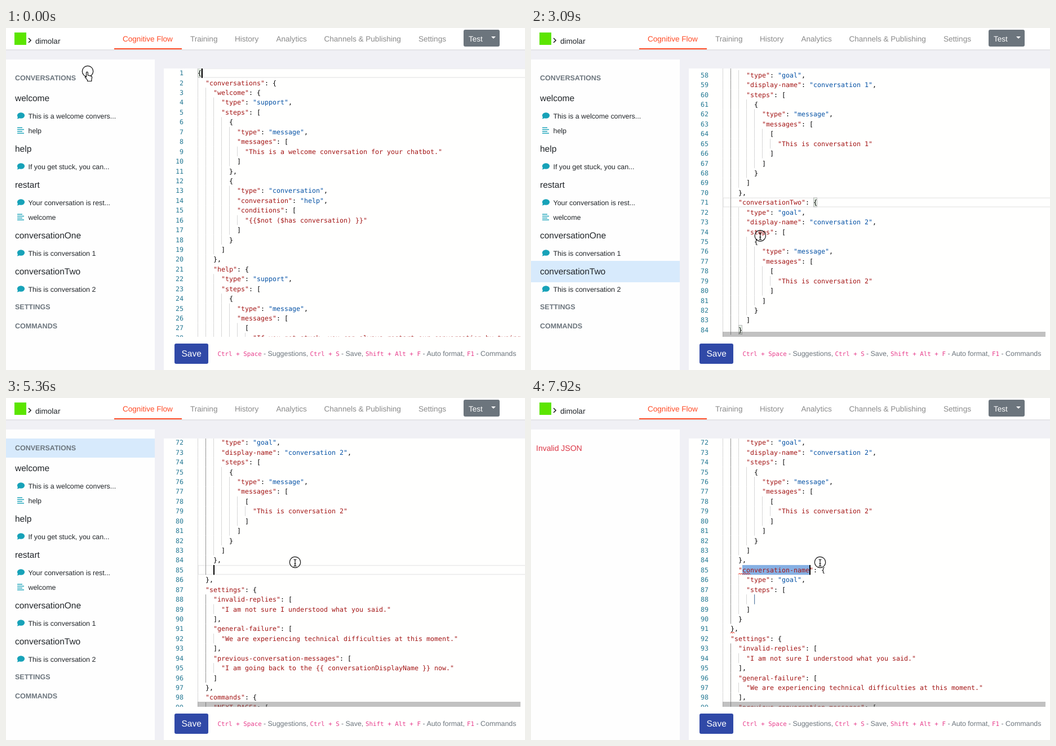
These frames come from a looping animation (921 px wide and 608 px high, 8000 ms). An HTML page:

```html
<!DOCTYPE html>
<html lang="en">
<head>
<meta charset="utf-8">
<title>Conversation editor</title>
<style>
html, body { margin: 0; width: 100%; height: 100%; overflow: hidden; background: #f0f0f5; }
svg { display: block; }
text { font: 13.55px "Liberation Sans", Arial, sans-serif; text-rendering: geometricPrecision; fill: #212529; }
.nav { fill: #8a8a8a; }
.head { font-size: 12.5px; font-weight: bold; fill: #6c757d; }
.topic { font-size: 15.49px; }
.item { font-size: 12.4px; }
.hint { font-size: 12.4px; fill: #6c757d; }
.key { font: 10.85px "DejaVu Sans Mono", monospace; fill: #e83e8c; }
.code { font: 11.63px "DejaVu Sans Mono", monospace; fill: #000; }
.num { fill: #237893; text-anchor: end; }
.red { fill: #a31515; }
.blue { fill: #0451a5; }
.hit { fill: #0070c0; font-weight: bold; }
</style>
</head>
<body>
<svg width="921" height="608" viewBox="0 0 921 608">
  <clipPath id="pane"><rect x="280" y="72" width="641" height="477"/></clipPath>
  <rect width="921" height="38" fill="#fff"/>
  <rect y="38" width="921" height="2" fill="#e4e4e8"/>
  <rect y="56" width="264" height="552" fill="#fefefe"/>
  <rect x="280" y="72" width="641" height="536" fill="#fffffe"/>
  <rect x="15" y="8" width="21" height="22" fill="#5ce500"/>
  <path d="M40 18l4 4-4 4" fill="none" stroke="#222" stroke-width="1.6"/>
  <text x="52" y="28">dimolar</text>
  <g id="nav"></g>
  <rect x="192" y="36" width="120" height="2" fill="#ff4b26"/>
  <rect x="812" y="3" width="64" height="30" rx="3" fill="#6c757d"/>
  <text x="821" y="24" style="fill:#fff">Test</text>
  <path d="M861 15h8l-4 4z" fill="#fff"/>
  <g id="side"></g>
  <g id="editor" clip-path="url(#pane)"></g>
  <rect x="299" y="561" width="60" height="36" rx="3" fill="#3049a7"/>
  <text x="311.5" y="584" class="topic" style="fill:#fff">Save</text>
  <g id="hints"></g>
  <g id="popup"></g>
  <g id="mouse"></g>
</svg>
<script>
const LOOP = 8000, ROW = 17.43, CH = 7, LEFT = 340;
const text = (x, y, s, cls) => `<text x="${x}" y="${y}" class="${cls}">${s}</text>`;
const rect = (x, y, w, h, fill, more = '') =>
  `<rect x="${x}" y="${y}" width="${w}" height="${h}" fill="${fill}" ${more}/>`;
const cache = {};
function show(id, html) {
  if (cache[id] !== html) document.getElementById(id).innerHTML = cache[id] = html;
}

show('nav', [[207, 'Cognitive Flow'], [327, 'Training'], [406, 'History'], [479.5, 'Analytics'],
  [564.5, 'Channels &amp; Publishing'], [732, 'Settings']]
  .map(([x, s], i) => text(x, 23.5, s, i ? 'nav" style="' : 'nav" style="fill:#ff4b26')).join(''));

show('hints', [[375.5, 'Ctrl + Space', 457, '- Suggestions,'], [539.5, 'Ctrl + S', 595, '- Save,'],
  [638, 'Shift + Alt + F', 739.5, '- Auto format,'], [818, 'F1', 834.5, '- Commands']]
  .map(([x, k, x2, s]) => text(x, 583, k, 'key') + text(x2, 583, s, 'hint')).join(''));

// Sidebar
const bubble = y => `<g fill="#17a2b8"><ellipse cx="26.5" cy="${y - .5}" rx="6.6" ry="5.2"/>` +
  `<path d="M21 ${y + 1}q0 3-1.4 4.6q3.2 0 5-2z"/></g>`;
const bars = y => [9, 12, 9, 12].map((w, i) => rect(20, y - 5.5 + i * 3.3, w, 1.4, '#17a2b8')).join('');
const menu = [[88, 'head', 'CONVERSATIONS'], [124, 'topic', 'welcome'],
  [156, 'say', 'This is a welcome convers...'], [182, 'go', 'help'], [214.5, 'topic', 'help'],
  [246, 'say', 'If you get stuck, you can...'], [278, 'topic', 'restart'],
  [310, 'say', 'Your conversation is rest...'], [336, 'go', 'welcome'],
  [368, 'topic', 'conversationOne'], [400, 'say', 'This is conversation 1'],
  [432, 'topic', 'conversationTwo'], [464, 'say', 'This is conversation 2'],
  [495, 'head', 'SETTINGS'], [529, 'head', 'COMMANDS']]
  .map(([y, kind, s]) =>
    kind == 'say' ? bubble(y) + text(39.5, y + 4.5, s, 'item') :
    kind == 'go' ? bars(y) + text(39.5, y + 4.5, s, 'item') :
    text(16, y + (kind == 'head' ? 4.7 : 5.5), s, kind)).join('');

function sidebar(t) {
  if (t >= 7420) return text(9, 94, 'Invalid JSON', 'bad" style="font-size:14px;fill:#dc3545');
  const mark = t < 2860 || t >= 5600 ? '' :
    t < 4650 ? rect(0, 414, 264, 38, '#d7eafc') : rect(0, 72, 264, 34, '#d7eafc');
  return mark + menu;
}

// Document shown in the editor
const say = messages => ({ type: 'message', messages });
const jump = (conversation, rule) => ({ type: 'conversation', conversation, conditions: [rule] });
const goal = n => ({ type: 'goal', 'display-name': 'conversation ' + n, steps: [say([['This is conversation ' + n]])] });
const source = JSON.stringify({
  conversations: {
    welcome: { type: 'support', steps: [say(['This is a welcome conversation for your chatbot.']),
      jump('help', '{{$not ($has conversation) }}')] },
    help: { type: 'support', steps: [say([[
      'If you get stuck, you can always restart our conversation by typing restart.', 'Just type help.']])] },
    restart: { type: 'support', 'display-name': 'restart', steps: [
      say([['Your conversation is restarted.', 'Welcome back.']]), jump('welcome', '{{$true}}')] },
    conversationOne: goal(1),
    conversationTwo: goal(2)
  },
  settings: {
    'invalid-replies': ['I am not sure I understood what you said.'],
    'general-failure': ['We are experiencing technical difficulties at this moment.'],
    'previous-conversation-messages': ['I am going back to the {{ conversationDisplayName }} now.']
  },
  commands: { 'NEXT-PAGE': ['Next 5', 'Next'], RESTART: ['restart'] }
}, null, 2).split('\n');
const snippet = ['    "conversation-name": {', '      "type": "goal",', '      "steps": [', '        ', '      ]', '    }'];

function lines(t) {
  const doc = source.slice();
  if (t >= 5180) doc[83] += ',';
  if (t >= 7840) doc.splice(84, 0, ...snippet);
  else if (t >= 5270) doc.splice(84, 0, '    ' + (t < 6290 ? '' : t < 6360 ? 'c' : 'con'));
  return doc;
}
const paint = s => s.replace(/(: )?("[^"]*")/g, (m, colon, str) =>
  colon ? `: <tspan class="blue">${str}</tspan>` : `<tspan class="red">${str}</tspan>`);

// Held values: the last entry whose start time has passed
const held = (t, list) => list.reduce((v, [at, value]) => t >= at ? value : v, list[0][1]);
const scrolls = [[0, 0], [2860, 990], [3360, 1000], [3450, 1010], [3530, 1026], [3620, 1060],
  [3710, 1120], [3790, 1190], [3880, 1238.5]];
// Caret as [line, column, visible]
const carets = [[0, [1, 1, 1]], [270, [1, 1, 0]], [800, [1, 1, 1]], [1340, [1, 1, 0]], [1880, [1, 1, 1]],
  [2410, [1, 1, 0]], [2860, [71, 23, 0]], [4410, [84, 5, 1]], [4920, [84, 5, 0]], [5180, [84, 6, 1]],
  [5270, [85, 4, 1]], [5870, [85, 4, 0]], [6290, [85, 5, 1]], [6360, [85, 7, 1]], [6910, [85, 7, 0]],
  [7420, [85, 7, 1]], [7840, [85, 22, 1]]];

const zigzag = (x, y, n) => `<path d="M${x} ${y}${'l1.75 -2l1.75 2'.repeat(n)}" fill="none" stroke="#e51400"/>`;

function editor(t, overPane) {
  const doc = lines(t), scroll = held(t, scrolls), [row, col, on] = held(t, carets);
  const mid = n => +(80 + (n - 1) * ROW - scroll).toFixed(2);
  const top = n => mid(n) - ROW / 2;
  const atX = c => LEFT + c * CH;
  const box = (n, c) => rect(atX(c) + .5, top(n) + .5, 6, 16, '#e6f0e6', 'stroke="#b9b9b9"');
  let out = '';
  if (t < 7840) out += rect(LEFT + 1, top(row) + .75, 590, ROW - 1.5, 'none', 'stroke="#eaeaea" stroke-width="1.5"');
  else out += rect(atX(5), top(85), 17 * CH, ROW, '#86b0e3') + rect(atX(8), top(88), 1.2, ROW, '#5b7fa6');
  if (t < 2860) out += box(1, 0);
  else if (t < 5180) out += box(71, 23 - 4 + 4) + box(84, 4);
  doc.forEach((s, i) => {
    const n = i + 1, y = mid(n);
    if (y < 55 || y > 565) return;
    const indent = s.search(/\S|$/);
    for (let c = 0; c < indent; c += 2) {
      const active = c == 2 && row > 2;
      out += rect(atX(c), top(n), 1, ROW, active ? '#939393' : '#d6d6d6');
    }
    out += text(315, y + 4.2, n, 'code num') + text(atX(indent), y + 4.2, paint(s.trim()), 'code');
  });
  if (t >= 5870 && t < 6910) out += zigzag(atX(5), mid(84) + 8, 2);
  if (t >= 6910) out += zigzag(atX(4), mid(85) + 8, 6) + zigzag(atX(2), mid(t < 7840 ? 86 : 91) + 8, 2);
  if (on) out += rect(atX(col), top(row), 2, ROW, '#000');
  if (overPane) out += rect(340, 540, 573, 9, '#646464', 'opacity=".4"');
  return out;
}

// Suggestions; underscores enclose the matched letters
const choices = ['_con_versation-goal', '_con_versation-support', 'step-_con_firmation',
  'step-entities-_con_firmation', 'step-_co_mma_n_d-go-to', 'step-_co_mma_n_d-invalidate-entity',
  'step-_co_mma_n_d-stay-silent', 'step-_co_mma_n_d-restart', 'step-_con_versation'];
function popup(t) {
  if (t < 6360 || t >= 7840) return '';
  const rows = choices.slice(0, t < 6430 ? 9 : 7);
  return rect(389.5, 315.5, 416, rows.length * 17.3, '#efeff2', 'stroke="#c4c4c8"') +
    rect(390, 316, 415, 17, '#d6ebff') +
    rows.map((s, i) => {
      const y = 324 + i * ROW;
      return rect(394.5, y - 4, 9, 9, 'none', 'stroke="#444" stroke-dasharray="2 .6"') +
        text(410, y + 4.2, s.replace(/_(\w+?)_/g, '<tspan class="hit">$1</tspan>'), 'code');
    }).join('') +
    text(728.5, 328.2, 'Snippet', 'code" style="fill:#555') +
    '<circle cx="787" cy="324" r="5" fill="#4a9fe0"/><path d="M787 321v1.4m0 1v3.6" stroke="#fff" stroke-width="1.3"/>';
}

// Pointer moves: start, end, number of steps, destination
const moves = [[60, 560, 6, 420, 300], [1810, 2600, 11, 121, 440], [2860, 3180, 5, 562, 331], [4030, 4410, 7, 513, 292]];
function pointer(t) {
  let x = 145, y = 77;
  for (const [from, to, n, tx, ty] of moves) {
    if (t < from) break;
    const k = Math.min(1, (Math.floor((t - from) / (to - from) * (n - 1)) + 1) / n);
    const e = k * k * (3 - 2 * k);
    x += (tx - x) * e;
    y += (ty - y) * e;
  }
  return [x, y];
}
const hand = 'M-2.5 10V2.5a1.4 1.4 0 0 1 2.8 0V7l5.5 1.3q2 .5 1.8 2.5l-.8 4.2v2.5h-7.3v-2q-2-2.5-4.3-5.2q.4-1.7 2.3-.3z';
const beam = 'M-2.5-5q2.5 0 2.5 1.5q0-1.5 2.5-1.5M0-4V6M-2.5 7q2.5 0 2.5-1.5q0 1.5 2.5 1.5M-1.5 2.5h3';
const mouse = (x, y) => `<g transform="translate(${x.toFixed(1)} ${y.toFixed(1)})" stroke="#111" stroke-width="1.2" fill="none">` +
  '<circle r="9.7"/>' + (x < 272 ? `<path d="${hand}" fill="#fff"/>` : `<path d="${beam}"/>`) + '</g>';

function frame(now) {
  const t = now % LOOP, [x, y] = pointer(t);
  show('side', sidebar(t));
  show('editor', editor(t, x > 280));
  show('popup', popup(t));
  show('mouse', mouse(x, y));
  requestAnimationFrame(tick);
}
let start;
function tick(now) {
  start ??= now;
  frame(now - start);
}
frame(0);
</script>
</body>
</html>
```
